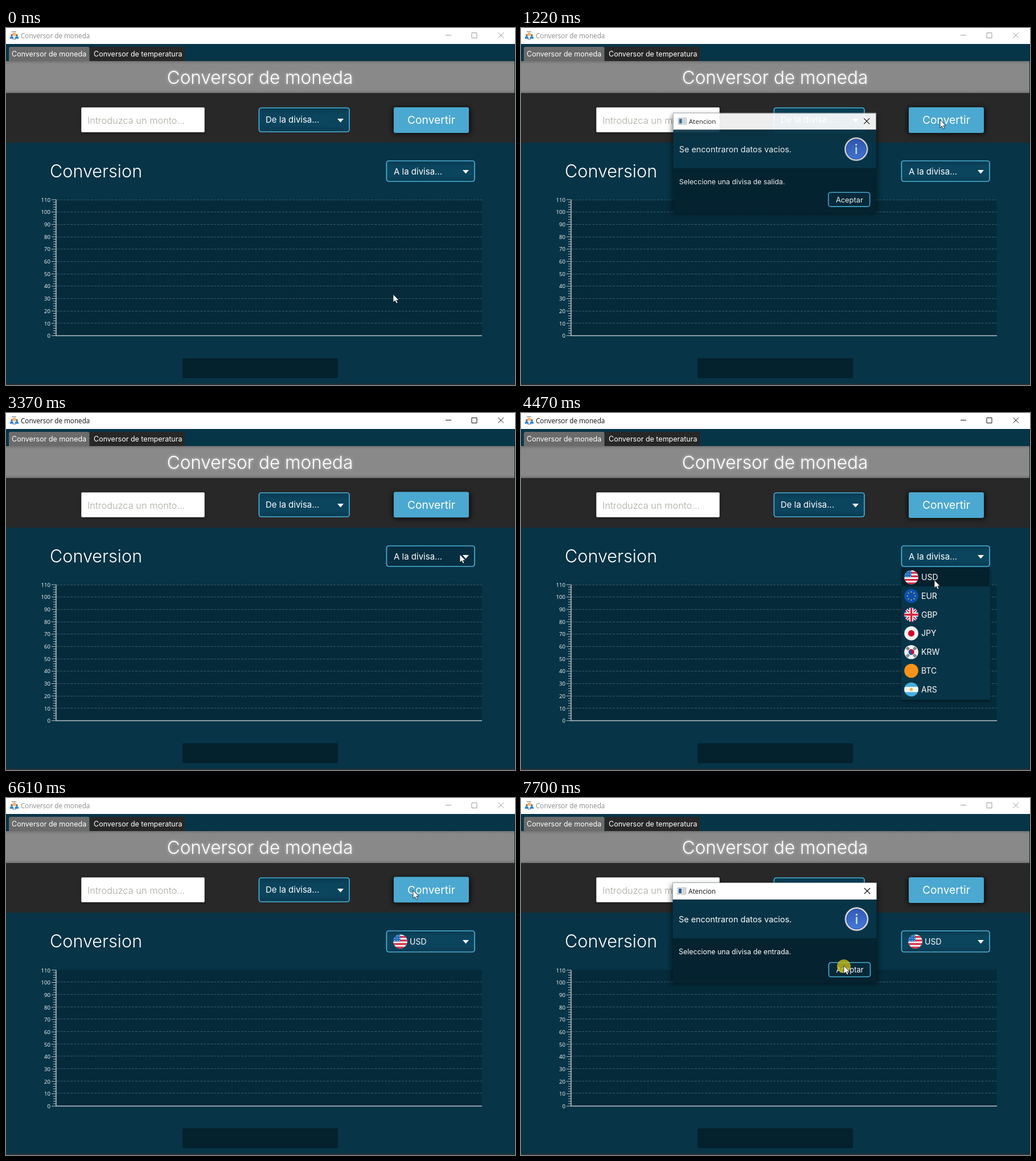
An HTML page that plays this animation: 894 by 626 pixels, repeating every 8000 ms.

```html
<!DOCTYPE html>
<html lang="es">
<head>
<meta charset="utf-8">
<title>Conversor de moneda</title>
<style>
html, body { margin: 0; width: 100%; height: 100%; overflow: hidden; background: #073446; }
svg { display: block; width: 100vw; height: 100vh; }
text { font-family: Inter, "Open Sans", sans-serif; font-weight: 400; fill: #fff; white-space: pre; }
.thin { font-weight: 300; }
.ui { font-family: "Open Sans", "Noto Sans", sans-serif; }
</style>
</head>
<body>
<svg id="stage" viewBox="0 0 894 626" xmlns="http://www.w3.org/2000/svg"></svg>
<script>
const LOOP = 8000;
const BG = '#073446', DARK = '#04212e', EDGE = '#4bb0d8';

const rect = (x, y, w, h, fill, more = '') =>
  `<rect x="${x}" y="${y}" width="${w}" height="${h}" fill="${fill}" ${more}/>`;
const circle = (x, y, r, fill, more = '') =>
  `<circle cx="${x}" cy="${y}" r="${r}" fill="${fill}" ${more}/>`;
const path = (d, stroke, w = 1, more = '') =>
  `<path d="${d}" fill="none" stroke="${stroke}" stroke-width="${w}" ${more}/>`;
const text = (x, y, size, s, more = '') =>
  `<text x="${x}" y="${y}" font-size="${size}" ${more}>${s}</text>`;
const group = (id, body) => `<g id="${id}">${body}</g>`;
const repeat = (n, f) => Array.from({ length: n }, (_, i) => f(i)).join('');

const defs = `<defs>
  <filter id="soft" x="-30%" y="-60%" width="160%" height="220%"><feGaussianBlur stdDeviation="5"/></filter>
  <filter id="blur" x="-30%" y="-60%" width="160%" height="220%"><feGaussianBlur stdDeviation="2.5"/></filter>
  <linearGradient id="head" x2="0" y2="1">
    <stop offset="0" stop-color="#747474"/><stop offset=".09" stop-color="#898989"/>
    <stop offset=".91" stop-color="#898989"/><stop offset="1" stop-color="#747474"/>
  </linearGradient>
  <linearGradient id="combo" x2="0" y2="1">
    <stop offset="0" stop-color="#083a50"/><stop offset=".25" stop-color="#0b445d"/>
    <stop offset=".75" stop-color="#0b445d"/><stop offset="1" stop-color="#083a50"/>
  </linearGradient>
  <linearGradient id="ball" x2="0" y2="1">
    <stop offset="0" stop-color="#3459b4"/><stop offset="1" stop-color="#4479dc"/>
  </linearGradient>
  <clipPath id="round"><circle r="12.3"/></clipPath>
</defs>`;

// Flags, drawn around 0,0 and clipped to a disc.
const ring = (n, r, f) => repeat(n, i => f(r * Math.cos(i * 2 * Math.PI / n), r * Math.sin(i * 2 * Math.PI / n)));
const field = fill => rect(-13, -13, 26, 26, fill);
const flags = {
  USD: field('#f4f4f4') +
    repeat(4, i => rect(-13, -9.4 + i * 6.2, 26, 3.1, '#d8243c')) +
    rect(-13, -13, 13, 13, '#1467b8') +
    repeat(9, i => circle(-9.5 + i % 3 * 4, -9.5 + Math.floor(i / 3) * 4, .8, '#fff')),
  EUR: field('#0b50b0') + ring(8, 7, (x, y) => circle(x, y, 1.1, '#d8c043')),
  GBP: field('#18509c') +
    path('M-13-13L13 13M13-13L-13 13', '#fff', 5) + path('M-13-13L13 13M13-13L-13 13', '#d8243c', 2) +
    path('M0-13V13M-13 0H13', '#fff', 7) + path('M0-13V13M-13 0H13', '#d8243c', 3.6),
  JPY: field('#f4f4f4') + circle(0, 0, 5.6, '#d80027'),
  KRW: field('#f4f4f4') +
    `<g transform="rotate(20)">${circle(0, 0, 5, '#1a56ae')}<path d="M-5 0a5 5 0 0 1 10 0a2.5 2.5 0 0 1-5 0a2.5 2.5 0 0 0-5 0" fill="#d80027"/></g>` +
    [45, 135, 225, 315].map(a => `<g transform="rotate(${a})">${path('M6.8-2.5V2.5M8.6-2.5V2.5M10.4-2.5V2.5', '#333')}</g>`).join(''),
  BTC: field('#f7931a'),
  ARS: field('#46aee0') + rect(-13, -4.6, 26, 9.2, '#f6f6f6') + circle(0, 0, 2.8, '#f3b63a')
};
const flag = (code, x, y) =>
  `<g transform="translate(${x} ${y})"><g clip-path="url(#round)">${flags[code]}</g></g>`;

const person = x => circle(x, 12.6, 1.7, '#6d5a50') +
  `<path d="M${x - 3.4} 18.800q0-4.600 3.400-4.600t3.400 4.600z" fill="#2d86d2"/>`;

const titleBar = rect(0, 0, 894, 28, '#fff') +
  circle(14.5, 11, 3.2, '#f2b878') + path('M10 6.5H18M11.500 19.500H17.500', '#777') +
  person(10) + person(19) +
  text(26, 17.5, 11.7, 'Conversor de moneda', 'class="ui" id="caption"') +
  group('buttons', '<path d="M772 12.5H782M818 8.5H827V17.5H818ZM864.5 8L874 17.5M874 8L864.5 17.5" fill="none"/>');

const tabs = rect(0, 28, 894, 30, '#073548') +
  '<path d="M5 58V36q0-3 3-3H143.500q3 0 3 3V58z" fill="#6b6b6b"/>' +
  '<path d="M147 58V36q0-3 3-3H311q3 0 3 3V58z" fill="#272727"/>' +
  text(10, 50, 12.5, 'Conversor de moneda') + text(154, 50, 12.5, 'Conversor de temperatura');

const heading = rect(0, 58, 894, 56, 'url(#head)') +
  text(446, 98, 31.5, 'Conversor de moneda', 'class="thin" text-anchor="middle" filter="url(#blur)" opacity=".6"') +
  text(446, 98, 31.5, 'Conversor de moneda', 'class="thin" text-anchor="middle"');

const combo = (id, x, y, w, h, body) => rect(x + 1, y + 1, w - 2, h - 2, 'url(#combo)',
    `id="${id}" rx="4" stroke="${EDGE}" stroke-width="1.700"`) + body +
  `<path d="M${x + w - 22} ${y + h / 2 - 2}h11l-5.500 6.500z" fill="#fff"/>`;

const form = rect(0, 114, 894, 87, '#282828') +
  rect(132, 140, 217, 44, '#000', 'rx="3" opacity=".45" filter="url(#blur)"') +
  rect(132, 139, 217, 44, '#fff', 'rx="3"') +
  rect(132.5, 139.5, 216, 43, 'none', 'rx="3" stroke="#c4c4c4"') +
  text(143, 167.5, 16.4, 'Introduzca un monto...', 'class="thin" style="fill:#a9aaa0"') +
  combo('from', 443.4, 139, 160.6, 44, text(456, 166, 15, 'De la divisa...')) +
  rect(680, 140, 135, 45, '#000', 'rx="4" opacity=".85" filter="url(#soft)"') +
  rect(681, 139, 132, 45, '#4ba8d0', 'rx="3" id="convert"') +
  text(747, 168, 19.2, 'Convertir', 'text-anchor="middle"');

const STEP = 21.68, BASE = 539.5;
const level = v => BASE - v / 10 * STEP;
const gridLine = v => path(`M89 ${Math.floor(level(v)) + .5}H836`, '#395966', 1, 'stroke-dasharray="4 2"');
const grid = rect(88, 301, 748, 239, '#052b3b') +
  repeat(10, i => gridLine(10 + i * 10)) + group('top', gridLine(110));
const axes =
  repeat(56, i => path(`M${i % 5 ? 83 : 80} ${level(i * 2)}H88`, '#b5c1c6')) +
  repeat(12, i => text(78, level(i * 10) + 3.7, 9.6, i * 10, 'class="ui" text-anchor="end"')) +
  path(`M88 301V540M87.500 ${BASE}H836`, '#b9c4c8', 1.5);

const page = text(77, 262, 30.6, 'Conversion', 'class="thin"') +
  combo('to', 667.4, 232, 156.6, 38,
    text(681, 256.5, 15, 'A la divisa...', 'id="prompt"') +
    group('picked', flag('USD', 692.5, 251.5) + text(709, 256.5, 14, 'USD'))) +
  grid + group('axes', axes) +
  rect(310, 579, 273, 35, DARK, 'rx="3"') +
  rect(0, 623.5, 894, 2.5, '#26323a') + rect(893, 28, 1, 598, '#052531');

const menu = rect(669, 276, 154, 229, '#000', 'opacity=".5" filter="url(#blur)"') +
  rect(668, 271, 156, 232, BG) +
  rect(668, 271, 155, 33, DARK, 'id="row"') +
  Object.keys(flags).map((code, i) => {
    const y = 288 + i * 32.8;
    return flag(code, 685.5, y) + text(703, y + 5, 14, code);
  }).join('');

const dialog = rect(264, 152, 363, 174, '#000', 'opacity=".5" filter="url(#soft)"') +
  rect(266.5, 149, 358, 29, '#fff') + rect(266.5, 178, 358, 68, BG) + rect(266.5, 246, 358, 78, '#04222f') +
  path('M266.500 178V148.500H624.500V178', '#8a9499', .8) +
  rect(275.5, 157.5, 14, 11, '#eceff1', 'stroke="#a5adb2"') + rect(277, 159, 5, 8, '#31648f') + rect(283, 159, 5, 8, '#c8d2d8') +
  text(294, 167.5, 11.7, 'Atencion', 'class="ui" style="fill:#111"') +
  path('M603 158L613 168M613 158L603 168', '#111', 1.2) +
  text(277, 217.5, 14.4, 'Se encontraron datos vacios.') +
  circle(589.5, 212.3, 20.6, '#e2e5e8', 'stroke="#8d989f"') +
  circle(589.5, 212.3, 17.7, 'url(#ball)', 'stroke="#24469a"') +
  circle(589.5, 204.5, 1.7, '#cfdff5') + path('M589.500 208.500V221', '#cfdff5', 2.6) +
  text(277, 274, 12.4, '', 'id="hint"') +
  rect(540.5, 288.5, 73, 25, '#06293a', `rx="4" stroke="${EDGE}" stroke-width="1.600"`) +
  text(577.5, 306, 12.9, 'Aceptar', 'text-anchor="middle"');

const pointer = circle(0, 1, 12, '#c4ba1c', 'id="click" opacity=".8"') +
  '<path d="M0 0V14L3.300 11L5.600 16L8 15L5.800 10.200H10Z" fill="#fff" stroke="#111" stroke-width=".8"/>';

const stage = document.getElementById('stage');
stage.innerHTML = defs + rect(0, 0, 894, 626, BG) + titleBar + tabs + heading + form + page +
  group('menu', menu) + group('dialog', dialog) + group('pointer', pointer);

// Start time, pointer position, and whatever differs from the idle screen.
const scenes = [
  [0, 680, 467, {}],
  [70, 628, 300, {}],
  [120, 575, 160, { hover: 'from' }],
  [660, 706, 166, {}],
  [1220, 736, 161, { alpha: .92, scale: .995 }],
  [1770, 636, 182, { alpha: 1 }],
  [2290, 571, 303, { alpha: 1 }],
  [3370, 797, 248, { active: true, hover: 'to', lift: true }],
  [3920, 797, 248, { active: true, hover: 'to', menu: true }],
  [4470, 726, 293, { active: true, menu: true, row: true }],
  [5540, 727, 164, { active: true, picked: true }],
  [6090, 717, 156, { active: true, picked: true }],
  [6610, 715, 162, { picked: true, lift: true }],
  [7140, 715, 162, { picked: true, alpha: .5, scale: .97 }],
  [7700, 567, 294, { picked: true, alpha: 1, click: true }]
];

const el = id => document.getElementById(id);
const show = (id, on) => el(id).setAttribute('visibility', on ? 'inherit' : 'hidden');
const move = (id, x, y) => el(id).setAttribute('transform', `translate(${x} ${y})`);

function draw(t) {
  const [, x, y, s] = scenes.filter(scene => scene[0] <= t).pop();
  el('caption').style.fill = s.active ? '#111' : '#8c8c8c';
  el('buttons').setAttribute('stroke', s.active ? '#111' : '#999');
  for (const id of ['from', 'to']) {
    el(id).setAttribute('fill', s.hover === id ? '#062f41' : 'url(#combo)');
  }
  move('convert', 0, s.lift ? -.7 : 0);
  show('prompt', !s.picked);
  show('picked', s.picked);
  el('to').setAttribute('height', s.picked ? 37 : 36);
  move('axes', 0, s.picked ? .8 : 0);
  show('top', !s.picked);
  show('menu', s.menu);
  show('row', s.menu && s.row);

  const k = s.scale || 1;
  show('dialog', s.alpha);
  el('dialog').setAttribute('opacity', s.alpha || 0);
  el('dialog').setAttribute('transform', `translate(445.5 237) scale(${k}) translate(-445.5 -237)`);
  el('hint').textContent = `Seleccione una divisa de ${s.picked ? 'entrada' : 'salida'}.`;

  move('pointer', x, y);
  show('click', s.click);
}

const start = performance.now();
function tick() {
  draw((performance.now() - start) % LOOP);
  requestAnimationFrame(tick);
}
tick();
</script>
</body>
</html>
```
